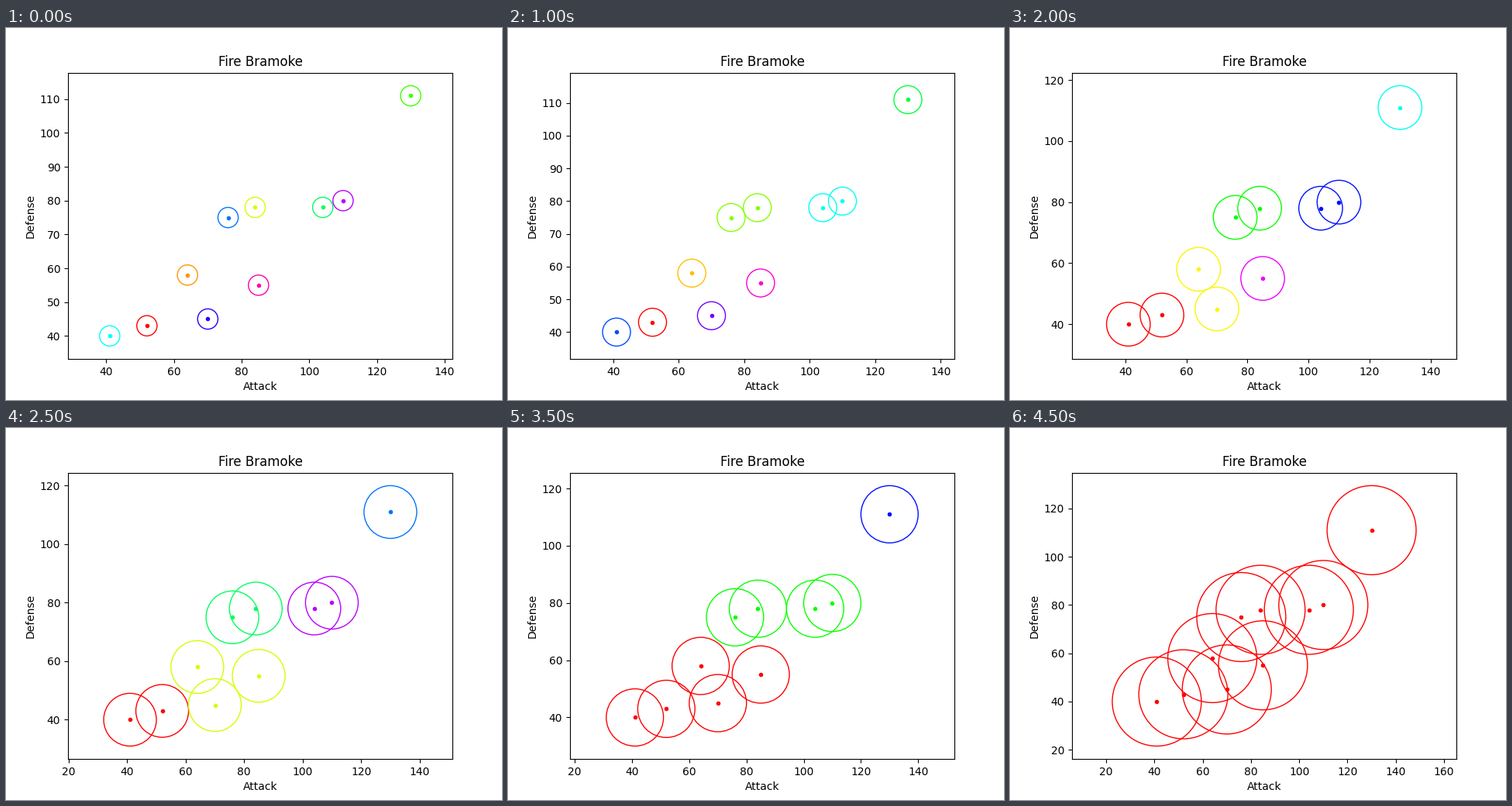
A matplotlib script for the animation above (5000 ms loop, 640 px wide and 480 px high).

```python
import itertools
import math

import matplotlib.pyplot as plt
from matplotlib.animation import FuncAnimation
from matplotlib.patches import Circle

POINTS = [(52, 43), (64, 58), (84, 78), (130, 111), (104, 78),
          (41, 40), (76, 75), (70, 45), (110, 80), (85, 55)]
START_RADIUS = 3
MARGIN = 1.1


def link_steps(points):
    """Single-linkage clustering: (radius, label of each point) per merge."""
    labels = list(range(len(points)))
    steps = [(START_RADIUS, labels[:])]
    pairs = sorted(itertools.combinations(range(len(points)), 2),
                   key=lambda p: math.dist(points[p[0]], points[p[1]]))
    for i, j in pairs:
        keep, drop = sorted((labels[i], labels[j]))
        if keep != drop:
            labels = [keep if k == drop else k for k in labels]
            steps.append((math.dist(points[i], points[j]) / 2, labels))
    return steps


def set_view(radius):
    """Fit all circles vertically and keep equal units on both axes."""
    xs, ys = zip(*POINTS)
    cx, cy = (min(xs) + max(xs)) / 2, (min(ys) + max(ys)) / 2
    half_h = MARGIN * ((max(ys) - min(ys)) / 2 + radius)
    box = ax.get_window_extent()
    half_w = half_h * box.width / box.height
    ax.set_xlim(cx - half_w, cx + half_w)
    ax.set_ylim(cy - half_h, cy + half_h)


def draw(frame):
    radius, labels = STEPS[frame]
    clusters = sorted(set(labels))
    ax.clear()
    for n, cluster in enumerate(clusters):
        color = plt.cm.hsv(n / len(clusters))
        for point, label in zip(POINTS, labels):
            if label == cluster:
                ax.plot(*point, ".", color=color)
                ax.add_patch(Circle(point, radius, fill=False, color=color))
    set_view(radius)
    ax.set_title("Fire Bramoke")
    ax.set_xlabel("Attack")
    ax.set_ylabel("Defense")
    return []


STEPS = link_steps(POINTS)
fig, ax = plt.subplots(figsize=(6.4, 4.8), dpi=100)
anim = FuncAnimation(fig, draw, frames=len(STEPS), interval=500,
                     init_func=lambda: draw(0), repeat=True, repeat_delay=0)
plt.show()
```
